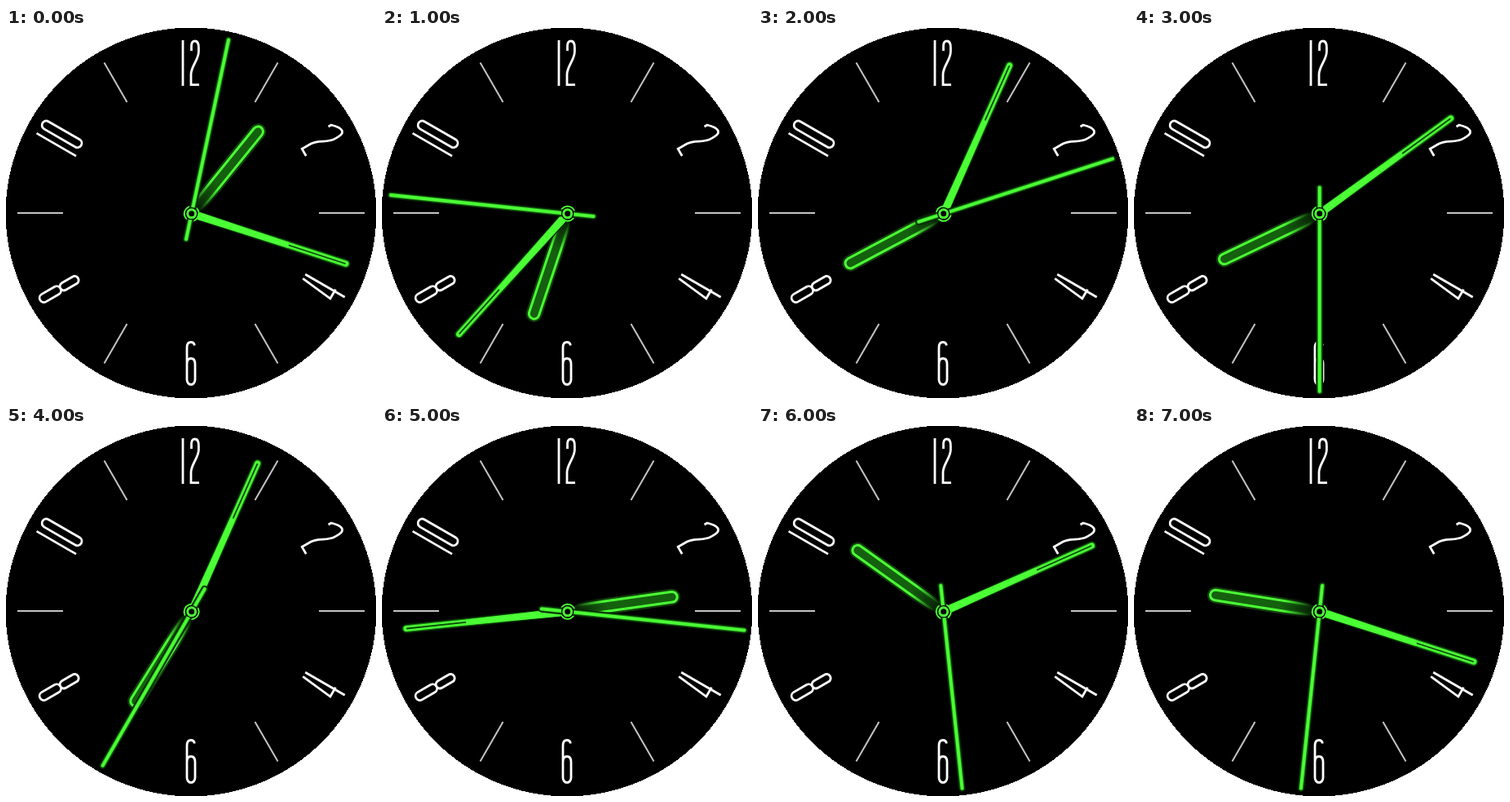
Recreate the animation shown at these times as an HTML page. Size 454x454 px, loop 8000 ms.

```html
<!DOCTYPE html>
<html lang="en">
<head>
<meta charset="utf-8">
<title>Neon watch face</title>
<style>
  html, body { margin: 0; width: 100%; height: 100%; overflow: hidden; background: #fff; }
  svg { display: block; width: 100vw; height: 100vh; }
  path, line { fill: none; stroke-linecap: round; stroke-linejoin: round; }
  #digits path { stroke: #fff; stroke-width: 2.8; stroke-linecap: butt; stroke-linejoin: miter; }
  #ticks line { stroke: #c4c4c4; stroke-width: 2; stroke-linecap: butt; }
  .halo { stroke: #052503; }
  .glow { stroke: #1c7d13; }
  .core { stroke: #4bff35; }
</style>
</head>
<body>
<svg viewBox="-227 -227 454 454">
  <defs>
    <linearGradient id="edge" gradientUnits="userSpaceOnUse" x1="0" y1="-10" x2="0" y2="-46">
      <stop offset="0" stop-color="#4bff35" stop-opacity="0"/>
      <stop offset="1" stop-color="#4bff35"/>
    </linearGradient>
    <linearGradient id="body" gradientUnits="userSpaceOnUse" x1="0" y1="-6" x2="0" y2="-50">
      <stop offset="0" stop-color="#15600e" stop-opacity=".3"/>
      <stop offset="1" stop-color="#15600e"/>
    </linearGradient>
  </defs>
  <circle r="227.4" shape-rendering="crispEdges"/>
  <g id="ticks"></g>
  <g id="digits"></g>
  <g transform="translate(.7 .8)">
    <g id="hour">
      <path d="M-6.3-6V-129.5A6.3 6.3 0 0 1 6.3-129.5V-6" stroke="url(#edge)" stroke-width="7.5" opacity=".25"/>
      <path d="M-6.3-6V-129.5A6.3 6.3 0 0 1 6.3-129.5V-6" style="fill:url(#body)" stroke="url(#edge)" stroke-width="3"/>
    </g>
    <g id="minute"></g>
    <g id="second"></g>
    <circle r="7.7"/>
    <circle r="5" stroke="#4bff35" stroke-width="3"/>
  </g>
</svg>
<script>
const $ = id => document.getElementById(id);

// Each dial figure: position angle, rotation, radius, strokes
const two = 'v-4Q0-27 4.7-27T9.4-19V-14C9.4-4 0 4 0 14V26.7H10';
const figures = [
  [0, 0, 184, 'M-10-28V28M.5-15' + two],
  [60, 60, 184, 'M-7.5-15' + two],
  [120, -60, 187, 'M5-28V28M-1-28L-5.5 13.5H7.5'],
  [180, 0, 184.5, 'M4.5-22Q3.5-26 0-26Q-5-26-5-19V20A5 6 0 0 0 5 20V1Q5-6 0-6T-5 1'],
  [240, 60, 187, 'M0-27A5 5 0 0 1 5-22V-7A5 5 0 0 1-5-7V-22A5 5 0 0 1 0-27ZM0-2A5.3 5.3 0 0 1 5.3 3.3V21.5A5.3 5.3 0 0 1-5.3 21.5V3.3A5.3 5.3 0 0 1 0-2Z'],
  [300, -60, 185, 'M-10-28V28M4.5-28A5.3 5.3 0 0 1 9.8-22.7V21.5A5.3 5.3 0 0 1-.8 21.5V-22.7A5.3 5.3 0 0 1 4.5-28Z']
];
$('digits').innerHTML = figures.map(([angle, turn, r, d]) =>
  `<path transform="rotate(${angle}) translate(0 ${-r}) rotate(${turn - angle})" d="${d}"/>`).join('');

$('ticks').innerHTML = [30, 90, 150, 210, 270, 330].map(angle =>
  `<line y1="-157" y2="-213" transform="rotate(${angle})"/>`).join('');

// A bright line with a dim halo around it
const neon = (d, width) => [['halo', 5], ['glow', 2], ['core', 0]].map(([name, extra]) =>
  `<path class="${name}" stroke-width="${width + extra}" d="${d}"/>`).join('');

const ring = 'M0-9A9 9 0 0 1 0 9A9 9 0 0 1 0-9';
$('minute').innerHTML = neon('M0-10V-199', 6.8) +
  `<path style="fill:#4bff35" d="M-4.7-9L-3.4-125H3.4L4.7-9Z"/>
   <path class="core" stroke-width="2" d="${ring}"/>
   <path stroke="#0b4507" stroke-width="1.8" d="M0-126V-198"/>`;
$('second').innerHTML = neon('M0 32V-218', 3.8);

// Times shown, one per second: hours, minutes, seconds
const times = [
  [1, 18, 2], [6, 37, 46], [8, 4, 12], [8, 9, 30],
  [7, 4, 35], [2, 44, 16], [10, 11, 29], [9, 18, 31]
];
const rotate = (id, angle) => $(id).setAttribute('transform', `rotate(${angle})`);
const start = performance.now();

function draw(now) {
  const step = Math.floor(Math.max(0, now - start) / 1000) % times.length;
  const [h, m, s] = times[step];
  rotate('hour', h * 30 + m / 2);
  rotate('minute', m * 6);
  rotate('second', s * 6);
  requestAnimationFrame(draw);
}
draw(start);
</script>
</body>
</html>
```
